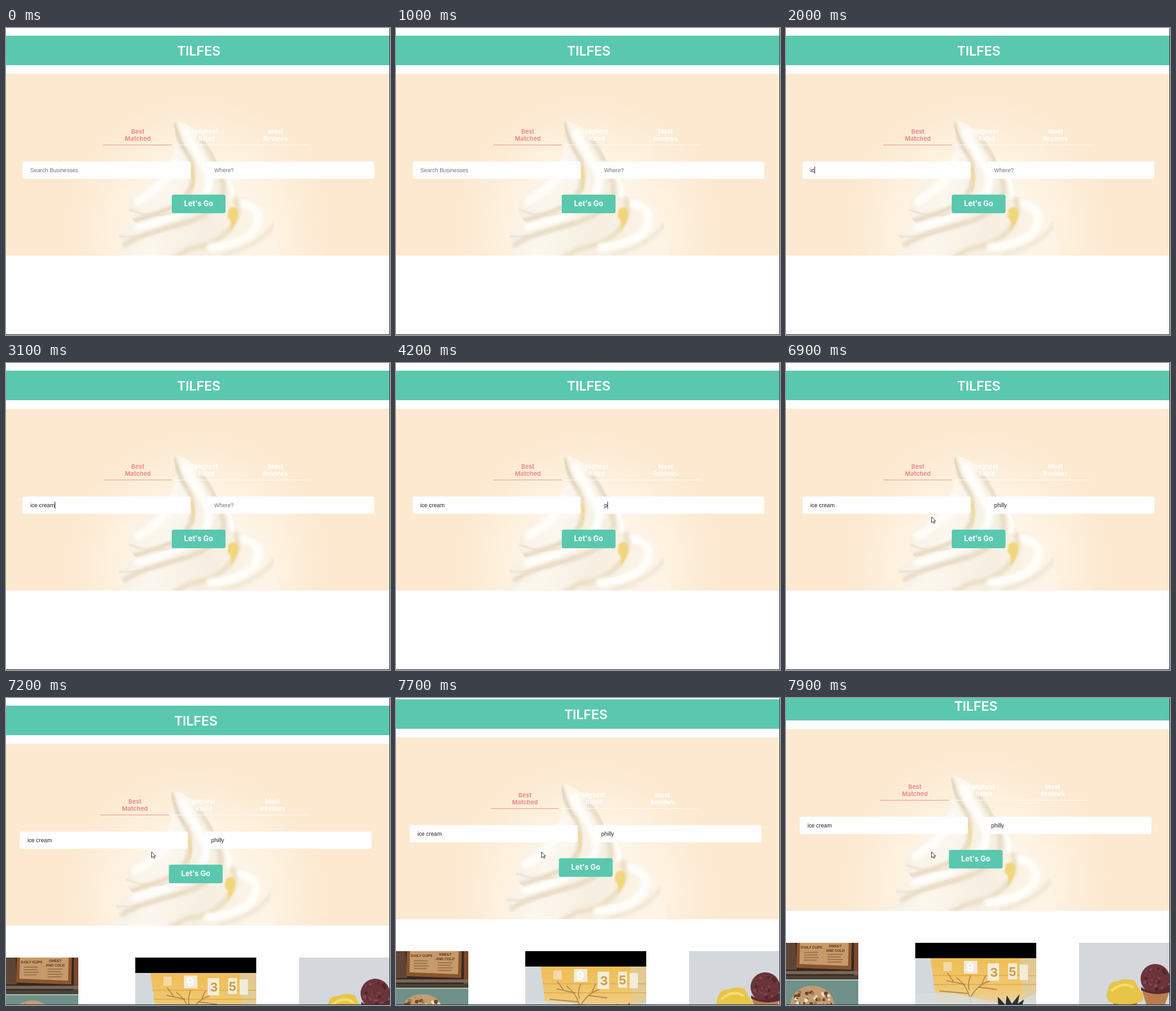
An HTML page for the animation above (8000 ms loop, 600 by 479 pixels).

```html
<!DOCTYPE html>
<html lang="en">
<head>
<meta charset="utf-8">
<title>Dessert search</title>
<style>
  html, body { margin: 0; width: 100%; height: 100%; overflow: hidden; background: #fefdff; }
  svg { display: block; width: 600px; height: 479px; }
  .title { font: 600 20.6px Inter, sans-serif; letter-spacing: -.2px; fill: #fff; }
  .tab { font: 700 9.4px Inter, sans-serif; fill: #fff; }
  .go { font: 700 11.3px Inter, sans-serif; fill: #fff; }
  .field { font: 8.75px "Liberation Sans", Arial, sans-serif; }
  .sign { font: 700 5.6px "Liberation Sans", Arial, sans-serif; fill: #57351f; }
  .number { font: 700 19px Inter, sans-serif; }
  .mid { text-anchor: middle; }
</style>
</head>
<body>
<svg viewBox="0 0 600 479">
  <defs>
    <radialGradient id="glow" gradientUnits="userSpaceOnUse" cx="300" cy="315" r="205">
      <stop offset="0" stop-color="#fffdf8"/>
      <stop offset=".55" stop-color="#fef3e2"/>
      <stop offset="1" stop-color="#fce9d0"/>
    </radialGradient>
    <linearGradient id="cream" x1="0" y1="0" x2="1" y2=".25">
      <stop offset="0" stop-color="#f3eadb"/>
      <stop offset=".4" stop-color="#fcf7ee"/>
      <stop offset=".7" stop-color="#f6efe1"/>
      <stop offset="1" stop-color="#fdf4e6"/>
    </linearGradient>
    <linearGradient id="street" x1="0" y1="0" x2="0" y2="1">
      <stop offset="0" stop-color="#efbd55"/>
      <stop offset=".5" stop-color="#f0c873"/>
      <stop offset="1" stop-color="#dfdcd3"/>
    </linearGradient>
    <filter id="soft" x="-50%" y="-50%" width="200%" height="200%"><feGaussianBlur stdDeviation="2.4"/></filter>
    <filter id="faint" x="-50%" y="-50%" width="200%" height="200%"><feGaussianBlur stdDeviation="1.3"/></filter>
    <clipPath id="hero"><rect y="71.5" width="600" height="283.5"/></clipPath>
    <clipPath id="swirl"><use href="#body"/></clipPath>
    <clipPath id="cardA"><rect x="0" y="405" width="113" height="120"/></clipPath>
    <clipPath id="cardB"><rect x="202" y="405" width="189" height="120"/></clipPath>
    <clipPath id="cardC"><rect x="458" y="405" width="142" height="120"/></clipPath>
  </defs>
  <rect width="600" height="479" fill="#fefdff"/>
  <g id="page">
    <rect y="12" width="600" height="46" fill="#5ac8ae"/>
    <rect y="71.5" width="600" height="283.5" fill="#fce9d0"/>

    <g id="content">
      <text class="title mid" x="301" y="42.5">TILFES</text>
      <g clip-path="url(#hero)">
        <rect x="60" y="100" width="480" height="255" fill="url(#glow)"/>
        <path id="body" fill="url(#cream)" d="M262 149Q264 144 269 145Q287 150 301 164Q318 181 329 207Q354 233 361 263Q394 264 407 281Q421 299 418 321Q429 337 427 356H178Q186 346 176 325Q176 314 205 305Q187 292 193 273Q205 249 235 231Q260 210 265 180Q265 163 262 149Z"/>
        <g clip-path="url(#swirl)" fill="none">
          <g filter="url(#soft)" stroke-linecap="round">
            <path d="M263 148Q270 179 283 196T290 246Q280 273 250 284T196 302" stroke="#e6d8c0" stroke-width="7"/>
            <path d="M304 172Q340 222 340 255Q328 293 270 307T186 338" stroke="#e9dcc6" stroke-width="8"/>
            <path d="M358 265Q369 291 348 315T287 344L262 358" stroke="#ecdfc5" stroke-width="8"/>
            <path d="M419 306Q402 336 340 354" stroke="#f2e7d4" stroke-width="7"/>
            <path d="M281 164Q301 198 314 225T292 277Q250 303 206 310" stroke="#fffefa" stroke-width="12"/>
            <path d="M338 216Q356 240 353 262" stroke="#fffefa" stroke-width="9"/>
            <path d="M371 274Q404 285 391 311T320 342" stroke="#fffefa" stroke-width="13"/>
            <path d="M262 212Q253 242 207 270" stroke="#fffdf8" stroke-width="14"/>
            <path d="M268 150Q284 154 296 168" stroke="#fffaf0" stroke-width="3"/>
          </g>
          <g filter="url(#faint)">
            <path d="M291 215Q299 237 289 261Q294 238 288 222Z" fill="#f1d98e"/>
            <path d="M348 283Q357 275 362 284Q366 298 350 318Q355 301 346 295Z" fill="#f1d67b"/>
            <path d="M264 153Q270 176 283 196" stroke="#e1d2b9" stroke-width="2"/>
            <path d="M192 283Q231 300 269 285M176 325Q230 329 279 302" stroke="#eadcc4" stroke-width="2"/>
          </g>
        </g>
      </g>

      <g class="mid" id="tabs"></g>
      <rect x="152" y="182" width="107.5" height="1" fill="#f0a09b"/>
      <rect x="259.5" y="182" width="216" height="1" fill="#fff" opacity=".75"/>
      <rect x="26" y="208.3" width="262.5" height="27" rx="3" fill="#fefdff"/>
      <rect x="313.5" y="208.3" width="262" height="27" rx="3" fill="#fefdff"/>
      <text class="field" id="what" x="38" y="224.6"></text>
      <text class="field" id="where" x="325.3" y="224.6"></text>
      <rect id="caret" y="216.5" width=".9" height="10.5" fill="#222"/>
      <rect id="button" x="259" y="260" width="84" height="29" rx="3"/>
      <text class="go mid" x="301" y="278.3">Let's Go</text>
    </g>

    <g id="results">
      <g clip-path="url(#cardA)">
        <rect y="405" width="113" height="120" fill="#36271f"/>
        <path d="M0 405H15L17 447H0Z" fill="#5f4535"/>
        <rect x="106" y="405" width="7" height="54" fill="#79492b"/>
        <path d="M17 402H103L102 447L16 444Z" fill="#8a552d"/>
        <path d="M22 402H98L97 441L21 438Z" fill="#c69a69"/>
        <g class="sign mid">
          <text x="40" y="414">DAILY CUPS</text>
          <text x="77" y="412">SWEET</text>
          <text x="77" y="418.5">AND COLD</text>
        </g>
        <path d="M28 420H50M28 424H49M28 428H51M28 432H48M65 423H88M65 427H86M65 431H89M65 435H87" stroke="#966e48" stroke-width="1.3"/>
        <rect y="449" width="113" height="5" fill="#76665a"/>
        <rect y="456" width="113" height="7" fill="#4a4036"/>
        <rect y="463" width="113" height="62" fill="#6f9189"/>
        <path d="M0 463H113" stroke="#a9b8aa" stroke-width="2"/>
        <ellipse cx="41" cy="501" rx="34" ry="29" fill="#c49c74"/>
        <g id="chips"></g>
      </g>

      <g clip-path="url(#cardB)">
        <rect x="202" y="405" width="189" height="24" fill="#000"/>
        <rect x="202" y="429" width="189" height="96" fill="url(#street)"/>
        <path d="M202 429H226L238 525H202Z" fill="#d3d8dc"/>
        <path d="M365 429H391V525H374Z" fill="#d7d0b6" opacity=".6"/>
        <path d="M229 456H391M231 470H391" stroke="#e2a443" stroke-width="2" opacity=".6"/>
        <g fill="#f2ecd8">
          <rect x="278" y="433" width="21" height="20"/>
          <rect x="315" y="437" width="18" height="27"/>
          <rect x="347" y="437" width="14" height="25"/>
          <rect x="365" y="439" width="13" height="24"/>
          <rect x="246" y="435" width="13" height="14" opacity=".6"/>
        </g>
        <g class="number mid" fill="#cf9b3c">
          <text x="288" y="450" fill="#fff">9</text>
          <text x="325" y="458">3</text>
          <text x="354" y="457">5</text>
        </g>
        <path d="M289 500Q286 474 266 459M289 489Q301 469 318 465M286 479Q284 464 289 456M280 470L251 464M301 474L330 478M284 484L240 480M262 466L252 452M306 469L312 456" fill="none" stroke="#ad7f4c" stroke-width="1.4"/>
        <path d="M202 486Q250 478 300 492T391 484V525H202Z" fill="#d9dfdf" opacity=".8"/>
        <path d="M332 525L331 489L343 502L345 487L353 500L365 485L362 500L372 493L362 525Z" fill="#29312f"/>
      </g>

      <g clip-path="url(#cardC)">
        <rect x="458" y="405" width="142" height="120" fill="#d4d7dc"/>
        <path d="M556 478H600L584 525H570Z" fill="#b97c4d"/>
        <circle cx="577" cy="461" r="23" fill="#6b343a"/>
        <path d="M555 474Q578 490 599 470L600 482Q577 489 555 479Z" fill="#562a31"/>
        <g id="berries"></g>
        <path d="M508 489H552L540 525H520Z" fill="#b87941"/>
        <path d="M505 497Q498 488 503 478Q506 464 518 465Q531 459 545 464Q549 474 557 484Q562 497 549 498Q529 506 505 497Z" fill="#e7c546"/>
        <path d="M508 480Q527 464 543 475" fill="none" stroke="#f5dc72" stroke-width="4"/>
      </g>
    </g>
  </g>

  <circle id="click" cx="316.5" cy="279" r="12" fill="#e2bb47"/>
  <path id="arrow" d="M0 0V9.2L2.2 7.2L3.7 10.2L5.2 9.5L3.8 6.7H6.5Z" fill="#fff" stroke="#333846" stroke-width=".9"/>
  <path d="M599.5 0V479M0 478.5H600" stroke="#3c3c3e"/>
</svg>
<script>
const LOOP = 8000;
const el = id => document.getElementById(id);
const show = (node, on) => node.setAttribute("visibility", on ? "visible" : "hidden");
const clamp = x => Math.max(0, Math.min(1, x));
const ease = x => x * x * (3 - 2 * x);
const svg = (tag, attrs, parent) => {
  const node = document.createElementNS("http://www.w3.org/2000/svg", tag);
  for (const key in attrs) node.setAttribute(key, attrs[key]);
  return parent.appendChild(node);
};

[["Best", "Matched"], ["Highest", "Rated"], ["Most", "Reviews"]].forEach((lines, i) =>
  lines.forEach((line, row) => {
    const label = svg("text", { class: "tab", x: 206 + i * 107.6, y: 165.4 + row * 10.8 }, el("tabs"));
    label.textContent = line;
    if (!i) label.style.fill = "#ec8d8d";
  }));

let seed = 7;
const random = () => (seed = seed * 16807 % 2147483647) / 2147483647;
function sprinkle(group, count, cx, cy, rx, ry, colors) {
  for (let i = 0; i < count; i++) {
    const angle = random() * Math.PI * 2, reach = Math.sqrt(random());
    svg("circle", {
      cx: cx + Math.cos(angle) * rx * reach, cy: cy + Math.sin(angle) * ry * reach,
      r: 1 + random() * 2, fill: colors[i % colors.length]
    }, group);
  }
}
sprinkle(el("chips"), 70, 41, 500, 31, 26, ["#6f452b", "#f0dfc6", "#a3774e"]);
sprinkle(el("berries"), 22, 577, 460, 19, 19, ["#844549", "#4f262d"]);

const fields = [
  { node: el("what"), hint: "Search Businesses", text: "ice cream", from: 500, start: 1850, step: 150, end: 3700 },
  { node: el("where"), hint: "Where?", text: "philly", from: 3700, start: 4150, step: 180, end: 5900 }
];

function drawFields(t) {
  const caret = el("caret");
  show(caret, false);
  for (const f of fields) {
    const count = t < f.start ? 0 : Math.min(f.text.length, 1 + Math.floor((t - f.start) / f.step));
    const typed = f.text.slice(0, count);
    f.node.textContent = typed || f.hint;
    f.node.setAttribute("fill", typed ? "#222" : "#757575");
    if (t < f.from || t >= f.end) continue;
    const typing = t >= f.start && t < f.start + f.step * f.text.length + 300;
    const width = typed ? f.node.getComputedTextLength() : 0;
    caret.setAttribute("x", +f.node.getAttribute("x") + width + .1);
    show(caret, typing || (t - f.from) % 1000 < 500);
  }
}

function drawPointer(t) {
  const pressed = t >= 5900 && t < 6200;
  const toButton = ease(clamp((t - 5500) / 400));
  const away = ease(clamp((t - 6200) / 500));
  const x = 345 - 30 * toButton - 87.5 * away;
  const y = 227 + 48 * toButton - 35 * away;
  el("arrow").setAttribute("transform", `translate(${x} ${y})`);
  show(el("arrow"), t >= 5500 && !pressed);
  show(el("click"), pressed);
  el("button").setAttribute("fill", pressed ? "#94d0c5" : "#5ac8ae");
}

function draw(t) {
  const loaded = t >= 7200;
  const scroll = Math.round(23 * clamp((t - 7300) / 600) ** 2);
  el("page").setAttribute("transform", `translate(0 ${-scroll})`);
  el("content").setAttribute("transform", `translate(${loaded ? -4.5 : 0} 0)`);
  el("results").style.display = loaded ? "" : "none";
  drawFields(t);
  drawPointer(t);
}

const began = performance.now();
function tick() {
  draw((performance.now() - began) % LOOP);
  requestAnimationFrame(tick);
}
tick();
</script>
</body>
</html>
```
